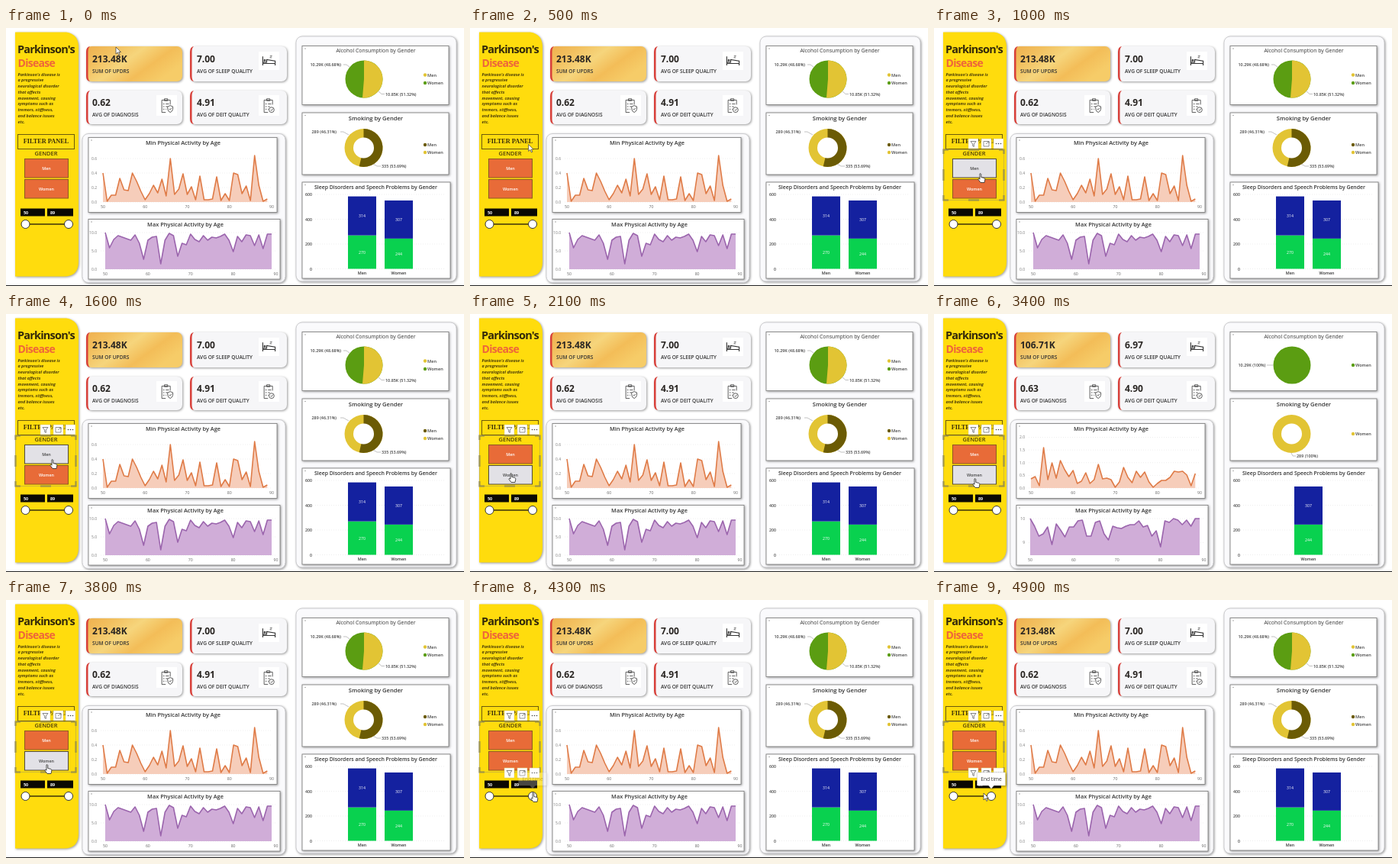
An HTML page that plays this animation: 600 px wide and 338 px high, repeating every 5000 ms.

```html
<!DOCTYPE html>
<html lang="en">
<head>
<meta charset="utf-8">
<style>
html, body { margin: 0; width: 100%; height: 100%; overflow: hidden; background: #fff; }
svg { display: block; width: 600px; height: 338px; font-family: "Open Sans", "Noto Sans", sans-serif; }
.soft { filter: drop-shadow(1.5px 1.5px 1.5px #0006); }
</style>
</head>
<body>
<svg id="stage" viewBox="0 0 600 338"></svg>
<script>
const stage = document.getElementById('stage');

const rect = (x, y, w, h, fill, more = '') =>
  `<rect x="${x}" y="${y}" width="${w}" height="${h}" fill="${fill}" ${more}/>`;
const circle = (x, y, r, fill, more = '') =>
  `<circle cx="${x}" cy="${y}" r="${r}" fill="${fill}" ${more}/>`;
const path = (d, stroke, width = 1, fill = 'none', more = '') =>
  `<path d="${d}" stroke="${stroke}" stroke-width="${width}" fill="${fill}" ${more}/>`;
const text = (s, x, y, size, { fill = '#333', weight = 400, anchor = 'start', more = '' } = {}) =>
  `<text x="${x}" y="${y}" font-size="${size}" font-weight="${weight}" fill="${fill}" text-anchor="${anchor}" ${more}>${s}</text>`;
const mid = { anchor: 'middle' };
const group = (id, body) => `<g id="${id}">${body}</g>`;
const shrink = (x, y, body) =>
  `<g transform="translate(${x} ${y}) scale(.85) translate(${-x} ${-y})">${body}</g>`;

// ---- sidebar ----
function sidebar() {
  const about = ["Parkinson's disease is", 'a progressive', 'neurological disorder', 'that affects',
    'movement, causing', 'symptoms such as', 'tremors, stiffness,', 'and balance issues', 'etc.'];
  return path('M12 5.500H79Q95 8 95 25V306Q95 325.500 76 325.500H12Z', 'none', 0, '#ffdc0d', 'class="soft"') +
    text("Parkinson's", 15, 33, 14.5, { weight: 700, fill: '#33290a', more: 'letter-spacing="-.8"' }) +
    text('Disease', 15.5, 51, 14, { weight: 700, fill: '#ee663b', more: 'letter-spacing="-.7"' }) +
    about.map((s, i) => text(s, 15.5, 62.5 + i * 7.75, 5.4,
      { weight: 700, fill: '#4a3d08', more: 'font-style="italic"' })).join('') +
    rect(15.5, 139.5, 74, 19, 'none', 'stroke="#6b5a0c"') +
    text('FILTER PANEL', 52.5, 150.5, 8.3,
      { ...mid, weight: 700, fill: '#3a300a', more: 'font-family="Liberation Serif, serif"' }) +
    text('GENDER', 52.5, 166.7, 7.5, { ...mid, fill: '#4a3d08', weight: 600 });
}

const button = (id, label, y) => group(id,
  rect(24.5, y, 57, 24.5, '#e86b38', 'stroke="#8d5a22"') +
  text(label, 53, y + 14.5, 5.4, { ...mid, weight: 600, fill: '#fff' }));

function header(y) {
  const boxes = [45, 62, 78].map(x => rect(x, y, 13, 13, '#fff', 'stroke="#d8c66a" stroke-width=".5"')).join('');
  return boxes + path(`M48 ${y + 3.5}h7l-2.7 3.5v3.5l-1.6-1v-2.500z`, '#666', .8) +
    path(`M65 ${y + 3.5}h7v6.500h-7zM68 ${y + 7}l4-3.500m-2.500 0h2.500v2.500`, '#777', .8) +
    [81.5, 84.5, 87.5].map(x => circle(x, y + 6.5, .8, '#444')).join('');
}

const brackets = path('M12.500 165V159.500H19M45 159.500H59M85 159.500H91.500V165M91.500 185V200M91.500 219V225.500H85M59 225.500H45M19 225.500H12.500V219M12.500 200V185',
  '#8b8448', 2) + rect(12.5, 159.5, 79, 66, 'none', 'stroke="#b0a34c" stroke-width=".6"');

const fields = [[19, 32, '50', 26], [54, 34, '89', 61]].map(([x, w, s, tx]) =>
  rect(x, 236.5, w, 10, '#0b0903') + text(s, tx, 243.7, 5.4, { ...mid, weight: 700, fill: '#fff' })).join('');

// ---- figures on top ----
const iconBox = (x, y, h, body) => rect(x, y, 27, h, '#fff') + shrink(x + 13.5, y + h / 2 + 1, body);

function icons() {
  const sheet = (x, y) => path(`M${x + 12} ${y + 24}h-6v-19h13v7M${x + 10} ${y + 6}v-3h5v3zM${x + 8} ${y + 11}h2m2 0h5M${x + 8} ${y + 15}h2m2 0h3M${x + 8} ${y + 19}h2m2 0h1`, '#444', 1);
  return iconBox(331, 31, 24,
    path('M335 36V50M335 47H354V50M354 47V43L341 41V45H335', '#333', 1.3) + circle(338, 42, 1.6, '#333') +
    path('M346 35h3l-3 3h3', '#333', .7)) +
    iconBox(197, 88, 27, sheet(197, 88) +
      path('M212 103l4-1.500 4 1.500v4q-1 4-4 5q-3-1-4-5zM214 106.500l1.500 1.500 2.700-3', '#444', 1, '#fff')) +
    iconBox(331, 88, 27, sheet(331, 88) + circle(348.5, 108, 4, '#fff', 'stroke="#444"') +
      path('M347 108l1.300 1.300 2.300-3', '#444'));
}
function cards() {
  return [[105, 24, 126, 46], [241, 24, 127, 46], [105, 82, 126, 44], [241, 82, 127, 44]].map(([x, y, w, h], i) =>
    rect(x, y, w, h, i ? '#f6f6f8' : 'url(#gold)', 'rx="7" class="soft"') +
    path(`M${x + 5} ${y}q-5 1-5 7v${h - 14}q0 6 5 7q-2.500-2-2.500-7v${14 - h}q0-5 2.500-7z`, 'none', 0, '#d8403a')
  ).join('') + icons();
}
function figures(values) {
  const labels = ['SUM OF UPDRS', 'AVG OF SLEEP QUALITY', 'AVG OF DIAGNOSIS', 'AVG OF DEIT QUALITY'];
  return values.map((v, i) => {
    const x = i % 2 ? 250 : 113, y = i < 2 ? 45 : 102;
    return text(v, x, y, 12, { weight: 700, fill: '#292522' }) + text(labels[i], x, y + 14, 6.6, { weight: 600 });
  }).join('');
}

// ---- panels ----
const card = (x, y, w, h) => rect(x, y, w, h, '#fff', 'stroke="#777" stroke-width=".8" class="soft"') +
  circle(x + 4, y + 3.5, .7, '#888');

function panels() {
  const panel = (x, y, w, h) => rect(x, y, w, h, '#fafafc', 'rx="8" stroke="#c4c4c8" stroke-width=".8" class="soft"');
  const title = (s, x, y, size, weight) => text(s, x, y, size, { ...mid, weight });
  return panel(100, 138.5, 266, 195) + card(108, 143.5, 247, 98) + card(108, 250.5, 251, 78.5) +
    panel(380, 11, 210, 321) + card(388, 23.5, 192, 77) + card(388, 111, 192, 81) + card(388, 202, 194, 126) +
    title('Min Physical Activity by Age', 232, 153, 7.4, 600) +
    title('Max Physical Activity by Age', 235, 260, 7.4, 600) +
    title('Alcohol Consumption by Gender', 484.5, 32, 6.9, 400) +
    title('Smoking by Gender', 484.5, 120.5, 7.6, 600) +
    title('Sleep Disorders and Speech Problems by Gender', 484.5, 210.5, 6.9, 600);
}

// heights are pixels above the base line, one per year of age from 50
function area(heights, x0, step, base, line, fill, ticks, lastLabel) {
  const d = 'M' + heights.map((h, i) => `${(x0 + i * step).toFixed(1)} ${base - h}`).join('L');
  const end = x0 + 39 * step;
  const tickLabels = ticks.map(([s, y]) =>
    path(`M124 ${y}H${lastLabel}`, '#ddd', .5, 'none', 'stroke-dasharray="1 2"') +
    text(s, 119, y + 1.8, 5, { anchor: 'end', fill: '#777' })).join('');
  const ages = [0, 1, 2, 3, 4].map(i =>
    text(50 + i * 10, x0 + (lastLabel - x0) * i / 4, base + 8, 5.2, { ...mid, fill: '#666' })).join('');
  return tickLabels + ages + path(`${d}L${end} ${base}H${x0}Z`, 'none', 0, fill) +
    path(d, line, 1.6, 'none', 'stroke-linejoin="round"');
}
const minArea = (heights, ticks) => area(heights, 127, 5.52, 228, '#df7b47', '#f6cdba', ticks, 348);
const maxArea = (heights, ticks, x0) => area(heights, x0, (348 - x0) / 39, 316, '#9b65ad', '#d0add8', ticks, 353.5);

// two slices, the first one clockwise from the top
function pie(x, y, r, share, first, second, hole) {
  const a = share * 2 * Math.PI;
  const px = x + r * Math.sin(a), py = y - r * Math.cos(a);
  return circle(x, y, r, second) +
    (share ? path(`M${x} ${y}V${y - r}A${r} ${r} 0 ${share > .5 ? 1 : 0} 1 ${px} ${py}Z`, 'none', 0, first) : '') +
    (hole ? circle(x, y, hole, '#fff') : '');
}
const callout = (s, x, y, line) => path(line, '#999', .6) + text(s, x, y, 5.4, { weight: 600, fill: '#444' });
const legend = items => items.map(([s, y, fill]) =>
  circle(549, y, 2.2, fill) + text(s, 552, y + 2, 5.6, { weight: 600, fill: '#444' })).join('');

function bars(list) {
  const scale = .1625, base = 315.5;
  const grid = [0, 200, 400, 600].map(v => {
    const y = base - v * scale;
    return path(`M405 ${y}H574`, '#ddd', .5, 'none', 'stroke-dasharray="1 2"') +
      text(v, 401, y + 2, 5.2, { anchor: 'end', fill: '#444', weight: 600 });
  }).join('');
  return grid + list.map(([name, x, low, high]) => {
    const a = low * scale, b = high * scale, white = { ...mid, fill: '#fff' };
    return rect(x, base - a, 37, a, '#09d14f') + rect(x, base - a - b, 37, b, '#14219f') +
      text(low, x + 18.5, base - a / 2 + 2, 5.2, white) + text(high, x + 18.5, base - a - b / 2 + 2, 5.2, white) +
      text(name, x + 18.5, 323, 5.4, { ...mid, weight: 600 });
  }).join('');
}

const yellow = '#e2c434', green = '#5b9d12', brown = '#6b5b04';

const everyone = figures(['213.48K', '7.00', '0.62', '4.91']) +
  minArea([38, 1, 9, 9, 31, 16, 15, 38, 27, 14, 3, 11, 22, 12, 30, 8, 57, 10, 17, 37,
    10, 20, 3, 34, 3, 3, 4, 33, 2, 11, 2, 38, 36, 11, 21, 2, 61, 22, 1, 4],
    [['0.0', 228], ['0.2', 209], ['0.4', 190], ['0.6', 171]]) +
  maxArea([48, 28, 39, 44, 42, 40, 38, 45, 34, 13, 38, 42, 43, 7, 38, 47, 44, 17, 34, 32,
    46, 39, 36, 44, 38, 42, 41, 43, 46, 38, 23, 43, 36, 45, 44, 31, 45, 27, 46, 46],
    [['10.0', 268], ['5.0', 292], ['0.0', 316]], 130) +
  pie(469, 67, 24.5, .5132, yellow, green) +
  callout('10.29K (48.68%)', 398.5, 50, 'M442 48H446L450 51') +
  callout('10.85K (51.32%)', 497, 88.5, 'M488 83L492 86.500H496') +
  legend([['Men', 61.5, yellow], ['Women', 72, green]]) +
  pie(468.5, 157, 25, .5369, brown, yellow, 13.5) +
  callout('289 (46.31%)', 400.5, 137.5, 'M438 136H442L449 140') +
  callout('335 (53.69%)', 492, 183, 'M481 178L486 181H491') +
  legend([['Men', 153, brown], ['Women', 163, yellow]]) +
  bars([['Men', 448, 270, 314], ['Women', 496, 244, 307]]);

const women = figures(['106.71K', '6.97', '0.63', '4.90']) +
  minArea([12, 15, 3, 53, 11, 33, 13, 36, 24, 15, 23, 6, 9, 20, 6, 11, 31, 12, 13, 11,
    1, 8, 27, 14, 7, 22, 14, 21, 8, 1, 6, 10, 10, 14, 22, 21, 22, 17, 3, 19],
    [['0.0', 228], ['0.5', 211.4], ['1.0', 194.8], ['1.5', 178.2], ['2.0', 161.6]]) +
  maxArea([48, 38, 25, 28, 37, 14, 41, 33, 24, 37, 37, 45, 46, 25, 25, 43, 45, 28, 20, 38,
    36, 35, 38, 40, 40, 45, 37, 39, 25, 32, 11, 45, 43, 48, 46, 40, 46, 38, 48, 48],
    [['10', 268], ['9', 299.5]], 126) +
  pie(469, 67, 24.5, 0, yellow, green) +
  callout('10.29K (100%)', 398.5, 69, 'M436 67H444') +
  legend([['Women', 67, green]]) +
  pie(468.5, 157, 25, 0, brown, yellow, 13.5) +
  callout('289 (100%)', 475, 188, 'M468 182L470 186H474') +
  legend([['Women', 157, yellow]]) +
  bars([['Women', 472, 244, 307]]);

const pointers =
  group('arrow', path('M0 0V9L2.200 7L3.800 10.500L5.200 9.800L3.700 6.500H6.500Z', '#333', .7, '#fff')) +
  group('hand', path('M0 0q1.200-1 1.800.500v4l4 1q1.200.500 1 2l-.8 4h-5l-3-4q0-1.500 1.600-.800l.4.500z', '#222', .8, '#fff'));

stage.innerHTML = `<defs><linearGradient id="gold" x2="1" y2=".5">
  <stop stop-color="#efb04e"/><stop offset=".25" stop-color="#f2c05f"/><stop offset=".5" stop-color="#f6d57c"/>
  <stop offset=".75" stop-color="#f3bd58"/><stop offset="1" stop-color="#f6cc68"/></linearGradient></defs>` +
  rect(0, 0, 600, 338, '#fff') + rect(0, 337, 600, 1, '#222') +
  sidebar() + cards() + panels() + group('everyone', everyone) + group('women', women) +
  button('menButton', 'Men', 171.5) + button('womenButton', 'Women', 198.5) +
  group('genderHead', brackets + header(145)) + fields +
  group('rangeHead', header(220)) +
  path('M26 257H81', '#3a300a', 1.3) + circle(25.5, 257, 5.5, '#fff', 'stroke="#333"') +
  circle(82, 257, 5.5, '#fff', 'id="knob" stroke="#333"') +
  group('tip', path('M-18.500 226H18.500V243H3.500L0 247L-3.500 243H-18.500Z', '#ccc', .5, '#fff', 'class="soft"') +
    text('End time', 0, 236.5, 6.7, mid)) + pointers;

// ---- motion ----
const $ = id => document.getElementById(id);
const show = (id, on) => $(id).setAttribute('visibility', on ? 'visible' : 'hidden');
const move = (id, x, y) => $(id).setAttribute('transform', `translate(${x} ${y})`);
const clamp = v => Math.min(1, Math.max(0, v));

// time, x, y of the pointer tip
const track = [[0, 144, 25], [700, 60, 184], [1000, 60, 191], [1700, 60, 191], [2000, 53, 209],
  [2100, 53, 209], [2500, 53, 216], [3900, 53, 216], [4200, 82, 252], [4300, 82, 253], [4900, 65, 253]];

function pointerAt(t) {
  const i = Math.max(1, track.findIndex(k => k[0] >= t));
  const [t0, x0, y0] = track[i - 1], [t1, x1, y1] = track[i];
  const p = (t - t0) / (t1 - t0), e = p * p * (3 - 2 * p);
  return [x0 + (x1 - x0) * e, y0 + (y1 - y0) * e];
}

function paint(id, lit) {
  const [box, label] = $(id).children;
  box.setAttribute('fill', lit ? '#e2e1e6' : '#e86b38');
  box.setAttribute('stroke', lit ? '#504a3c' : '#8d5a22');
  label.setAttribute('fill', lit ? '#444' : '#fff');
}

function frame() {
  const t = Math.floor(performance.now() % 5000 / 100) * 100;
  const [x, y] = pointerAt(t);
  const over = top => x > 24 && x < 82 && y > top && y < top + 25;
  const filtered = t >= 2500 && t < 3800;
  const onMen = over(171), onWomen = over(198);
  const hand = onMen || onWomen || (t >= 4200 && t < 4500);
  const knob = 82 - 7 * clamp((t - 4300) / 600);
  show('everyone', !filtered);
  show('women', filtered);
  paint('menButton', onMen);
  paint('womenButton', onWomen || filtered);
  show('genderHead', t >= 600);
  show('rangeHead', t >= 4200);
  $('knob').setAttribute('cx', knob);
  move('tip', knob, 0);
  $('tip').setAttribute('opacity', clamp((t - 4200) / 400));
  show('arrow', !hand);
  show('hand', hand);
  move('arrow', x, y);
  move('hand', x, y);
  requestAnimationFrame(frame);
}
frame();
</script>
</body>
</html>
```
